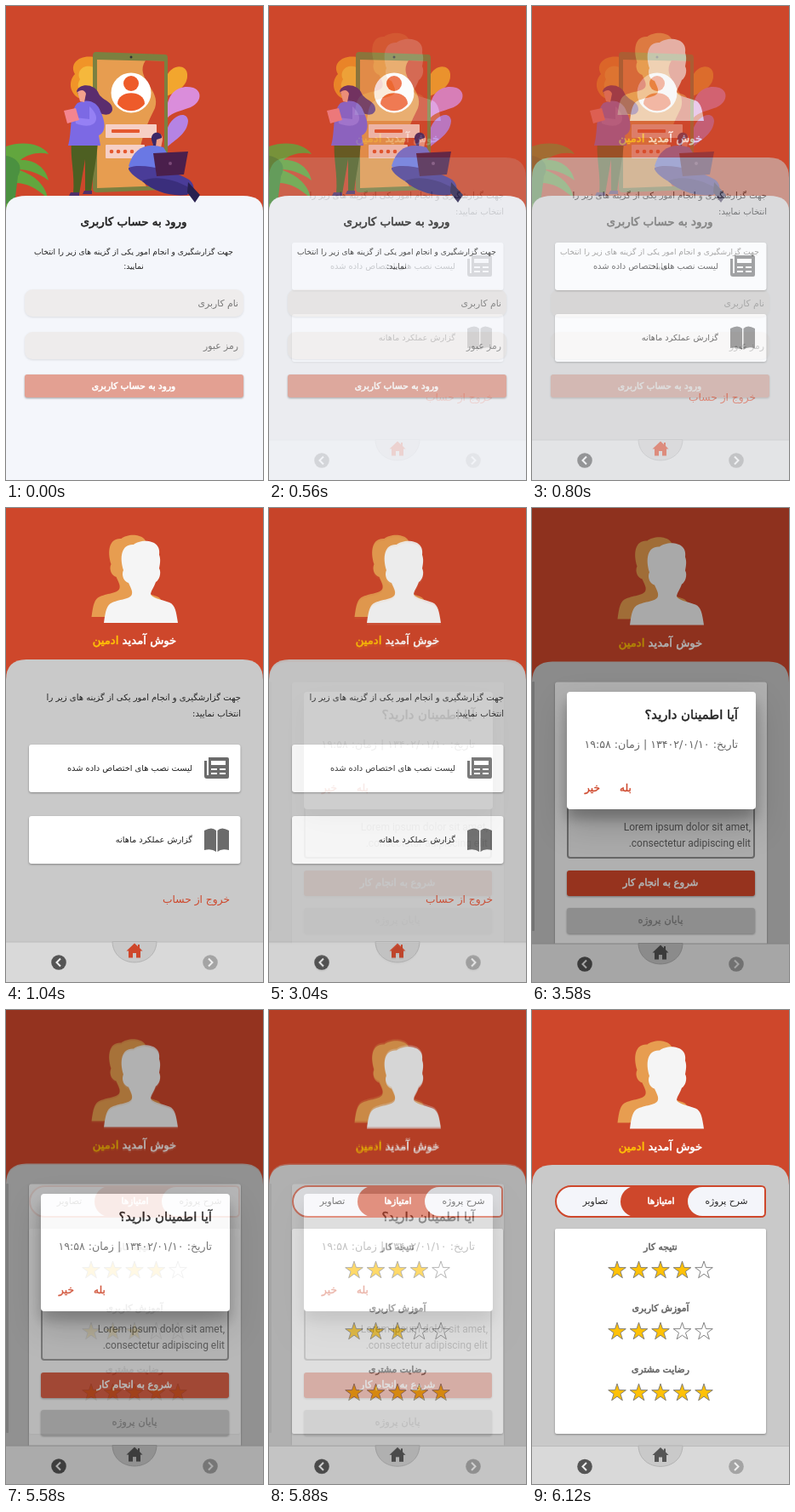
These frames come from a looping animation (302 px wide and 557 px high, 8 s). An HTML page:

```html
<!DOCTYPE html>
<html lang="fa">
<head>
<meta charset="utf-8">
<style>
html, body { margin: 0; width: 100%; height: 100%; overflow: hidden; background: #ce472b; }
svg { display: block; width: 302px; height: 557px; }
text { font-family: "DejaVu Sans", sans-serif; direction: rtl; }
.latin { font-family: Roboto, sans-serif; direction: ltr; text-anchor: end; }
.raised { filter: drop-shadow(0 1px 1px rgba(0,0,0,.35)); }
.field { filter: drop-shadow(0 1px 1px rgba(0,0,0,.1)); }
.dialog { filter: drop-shadow(0 11px 7px rgba(0,0,0,.22)) drop-shadow(0 16px 18px rgba(0,0,0,.2)); }
</style>
</head>
<body>
<svg id="stage" viewBox="0 0 302 557"></svg>
<script>
const RED = '#ce472b', ORANGE = '#e79d50', GREY = '#c9c9c9';
const intro = 'جهت گزارشگیری و انجام امور یکی از گزینه های زیر را';

// Arabic glyph proportions vary by font, so sizes are given in a normalised unit.
const ctx = document.createElement('canvas').getContext('2d');
ctx.font = '100px "DejaVu Sans", sans-serif';
const unit = 1950 / ctx.measureText(intro + ' انتخاب').width;

const path = (d, fill, more = '') => `<path d="${d}" fill="${fill}" ${more}/>`;
const rect = (x, y, w, h, r, fill, more = '') =>
  `<rect x="${x}" y="${y}" width="${w}" height="${h}" rx="${r}" fill="${fill}" ${more}/>`;
const dot = (x, y, r, fill) => `<circle cx="${x}" cy="${y}" r="${r}" fill="${fill}"/>`;
const move = (x, y, body) => `<g transform="translate(${x} ${y})">${body}</g>`;

// A thin outline makes a medium weight without the wide letters of the bold face.
const text = (x, y, size, str, fill, outline = 0, anchor = 'middle') =>
  `<text x="${x}" y="${y}" font-size="${(size * unit).toFixed(2)}" fill="${fill}" stroke="${fill}" stroke-width="${outline}" text-anchor="${anchor}">${str}</text>`;
const strong = (x, y, size, str, fill) => text(x, y, size, str, fill, .6);
const right = (x, y, size, str, fill, outline) => text(x, y, size, str, fill, outline, 'start');
const latin = (x, y, str) => `<text class="latin" x="${x}" y="${y}" font-size="12" fill="#666">${str}</text>`;
const raised = 'class="raised"';

const backdrop = (top, fill, r = 24) =>
  path(`M0 557V${top + r}Q0 ${top} 24 ${top}H278Q302 ${top} 302 ${top + r}V557Z`, fill);

const person = fill => path(`M115 135C117 121 118 114 125 111C135 107 147 107 148 101C149 97 146 93 144 88
  C139 87 135 79 138 73C133 57 136 42 150 43C158 36 183 36 180 55C182 60 181 66 180 71C183 76 180 85 176 87
  C174 93 171 96 170 101C171 106 182 107 192 111C199 114 200 122 202 135Z`, fill);

const header = dy => rect(0, 0, 302, 557, 0, RED) + move(0, dy,
  move(-14.5, -7, person(ORANGE)) + person('#f5f5f5') +
  strong(151, 160, 17.5, 'خوش آمدید <tspan fill="#ffc107" stroke="#ffc107">ادمین</tspan>', '#fff'));

const arrow = (x, fill, dir) => dot(x, 534, 8.8, fill) +
  path(`M${x - 2 * dir} 529.5l${4.5 * dir} 4.5l${-4.5 * dir} 4.5`, 'none', 'stroke="#eee" stroke-width="2"');

const nav = (dy, home, fill = '#d9d9d9') => move(0, dy,
  rect(0, 510, 302, 50, 0, fill) + rect(0, 509.5, 302, 1, 0, '#bbb') +
  path('M125 509.5C126 542 176 542 177 509.5Z', GREY, 'stroke="#b3b3b3"') +
  path('M151 511.5L141.5 520.5H144V528.5H149V523H153V528.5H158V520.5H160.5L157 517V513H155V515.2Z', home) +
  arrow(62, '#555', -1) + arrow(240, '#a4a4a4', 1));

const leaves = path('M0 165C20 158 42 162 50 174C38 171 26 174 17 181C33 180 47 190 50 205C38 196 26 192 13 192C30 197 46 208 49 226C36 214 24 208 12 208L0 240Z', '#62a63e') +
  path('M0 176C10 177 22 186 14 200L10 232H0Z', '#4b9140');

const petals = path('M103 60C86 57 74 68 81 80C72 89 75 106 90 110H103Z', '#f09428') +
  path('M103 72C91 67 82 77 87 86C80 98 90 104 103 104Z', '#f5b83c') +
  path('M189 82C195 68 212 68 213 80C214 94 202 100 189 106Z', '#f2a62e') +
  path('M189 122C190 101 204 92 220 96C233 101 228 116 214 120C204 124 197 124 189 132Z', '#da8ddb') +
  path('M189 146C194 128 213 122 214 135C213 150 199 157 189 166Z', '#b583e4');

const phone = path('M106 54L187 57Q190 57 190 61V213Q190 216 186 216L107 219Q102 219 102 214V58Q102 54 106 54Z', '#7b8040') +
  path('M107 63L186 65V211L107 214Z', ORANGE) +
  path('M164 64C150 85 183 98 175 120C160 150 148 182 165 212L186 211V65Z', RED) +
  dot(147, 60, 1.5, '#333') +
  dot(147, 102, 23.5, '#fff') + dot(147, 91, 9, '#ee5b2a') +
  path('M131 115C131 98 163 98 163 115C155 126 139 126 131 115Z', '#ee5b2a') +
  rect(117, 139, 60, 16, 1, '#f6cfc5') + rect(124, 145, 33, 4, 1, '#e5582f') +
  rect(117, 163, 46, 16, 1, '#f6cfc5') + [124, 132, 140, 148].map(x => dot(x, 171, 2.3, '#e5582f')).join('');

const woman = path('M83 100C86 90 105 91 109 103C113 111 126 112 125 122C123 131 111 128 104 122L91 117Z', '#5b2d6e') +
  path('M77 158H108C107 180 102 198 100 219H93L93 180L86 221H79C81 196 75 178 77 158Z', '#4d5f22') +
  path('M84 114C96 108 108 113 111 124C117 136 118 148 109 152L111 164H73C78 148 74 124 84 114Z', '#7c69e4') +
  path('M98 118C114 132 105 147 82 138L81 131L98 133Z', '#9580f4') +
  path('M84 101Q91 96 94 103L92 113L87 112Z', '#f3a18c') +
  path('M68 123L82 120L86 134L72 138Z', '#f4858f') +
  path('M76 219H86V223H74Z M92 217H101V221H90Z', '#50306a');

const man = path('M172 160C173 149 184 146 184 157L182 167H174Z', '#eda18b') +
  path('M171 157C170 146 184 147 183 155L177 157L176 165L173 164Z', '#3b2766') +
  path('M144 188C150 167 164 160 185 166L200 190L194 204H160Z', '#6a78e4') +
  path('M144 190C158 184 195 192 215 204C225 212 220 222 208 222C188 220 151 206 144 192Z', '#4a3c98') +
  path('M160 206C172 199 196 202 216 214L213 222C192 224 174 218 160 206Z', '#3a2e7c') +
  path('M214 207L228 222L222 231L213 219Z', '#28204f') +
  path('M173 173L214 171L209 198L177 200Z', '#4a1f4c') + dot(193, 185, 2, '#7a4a78');

const field = (y, label) => rect(22, y, 257, 32, 9, '#eeecec', 'class="field"') + right(273, y + 20, 14.3, label, '#777');

const login = rect(0, 0, 302, 557, 0, RED) + leaves + backdrop(223, '#f4f6fb', 18) + petals + phone + woman + man +
  strong(150, 258, 17.8, 'ورود به حساب کاربری', '#222') +
  text(150, 292, 12, intro + ' انتخاب', '#222') + text(150, 309, 12, 'نمایید:', '#222') +
  field(333, 'نام کاربری') + field(383, 'رمز عبور') +
  rect(22, 433, 257, 27, 3, '#e3a092', raised) +
  strong(150, 450, 14, 'ورود به حساب کاربری', '#fff');

const newspaper = path('M238 293H260Q262 293 262 295V316Q262 318 260 318H236Q233 318 233 315V297H236V314H238Z', '#6b6b6b') +
  rect(241, 297, 17, 5, 0, '#fff') +
  [[241, 306], [251, 306], [241, 311], [251, 311]].map(([x, y]) => rect(x, y, 7, 2, 0, '#fff')).join('');
const book = path('M233 379Q242 374 247 379V404Q242 400 233 402Z M262 379Q253 374 248.5 379V404Q253 400 262 402Z', '#6b6b6b');
const option = (y, label, icon) => rect(27, y, 248.5, 56, 3, '#fff', raised) + icon + right(219, y + 31, 13, label, '#222');

const menu = header(0) + backdrop(178, GREY) +
  right(276, 226, 13.3, intro, '#222') + right(276, 245, 13.3, 'انتخاب نمایید:', '#222') +
  option(278, 'لیست نصب های اختصاص داده شده', newspaper) +
  option(362, 'گزارش عملکرد ماهانه', book) +
  right(263, 464, 16.2, 'خروج از حساب', RED) + nav(0, RED);

const confirm = header(2.5) + backdrop(180.5, GREY) + rect(0, 204, 3, 293, 1, '#a6a6a6') +
  rect(27, 204.5, 249, 320, 3, '#fff', raised) +
  rect(42, 300, 219, 111, 3, '#f8f8f8', 'stroke="#959595" stroke-width="2"') +
  latin(257, 379, 'Lorem ipsum dolor sit amet,') + latin(257, 398, '.consectetur adipiscing elit') +
  rect(41, 426, 221, 30, 3, '#d94a2b', raised) + strong(151, 444, 15.4, 'شروع به انجام کار', '#fff') +
  rect(41, 470, 221, 30, 3, '#cecece', raised) + text(151, 488, 15.4, 'پایان پروژه', '#888', .3) +
  nav(2, '#555', '#f0f0f0') + rect(0, 0, 302, 557, 0, '#000', 'opacity=".31"') +
  rect(41, 216, 222, 138, 4, '#fff', 'class="dialog"') +
  right(242, 248, 19.8, 'آیا اطمینان دارید؟', '#222', .5) +
  right(242, 282, 16.7, 'تاریخ: ۱۳۴۰۲/۰۱/۱۰ | زمان: ۱۹:۵۸', '#666') +
  text(110, 333, 16, 'بله', RED, .4) + text(71, 333, 16, 'خیر', RED, .4);

const starPoints = Array.from({ length: 10 }, (_, i) => {
  const r = i % 2 ? 4.2 : 10.8, a = i * Math.PI / 5;
  return (r * Math.sin(a)).toFixed(2) + ',' + (-r * Math.cos(a)).toFixed(2);
}).join(' ');
const rating = (y, label, score) => strong(151, y, 14.3, label, '#666') +
  [0, 1, 2, 3, 4].map(i => move(100 + 25.5 * i, y + 24,
    `<polygon points="${starPoints}" fill="${i < score ? '#ffc107' : '#fff'}" stroke="#777" stroke-width=".9"/>`)).join('');

const scores = header(4.5) + backdrop(182, GREY) +
  path('M46 207H269Q274 207 274 212V238Q274 243 269 243H46A18 18 0 0 1 46 207Z', '#f4f5fa', `stroke="${RED}" stroke-width="2"`) +
  path('M122 207H205V243H122A18 18 0 0 1 122 207Z', RED) +
  path('M200 208H269Q273 208 273 212V238Q273 242 269 242H200A17 17 0 0 1 200 208Z', '#f4f5fa') +
  text(228.5, 228, 14.2, 'شرح پروژه', '#222') + strong(151.5, 228, 14, 'امتیازها', '#fff') +
  text(74.5, 228, 14.2, 'تصاویر', '#222') +
  rect(27, 257, 248, 241, 2, '#fff', raised) +
  rating(282, 'نتیجه کار', 4) + rating(354, 'آموزش کاربری', 3) + rating(426, 'رضایت مشتری', 5) +
  nav(2.5, '#555');

const stage = document.getElementById('stage');
stage.innerHTML = [login, menu, confirm, scores].map(s => `<g>${s}</g>`).join('');
const screens = [...stage.children];
const starts = [500, 3040, 5580];

// Each screen fades in over the previous one in ten steps of 60 ms.
function draw() {
  const t = performance.now() % 8000;
  starts.forEach((s, i) => {
    const step = Math.floor((t - s) / 60) + 1;
    screens[i + 1].setAttribute('opacity', Math.max(0, Math.min(10, step)) / 10);
  });
  requestAnimationFrame(draw);
}
draw();
</script>
</body>
</html>
```
